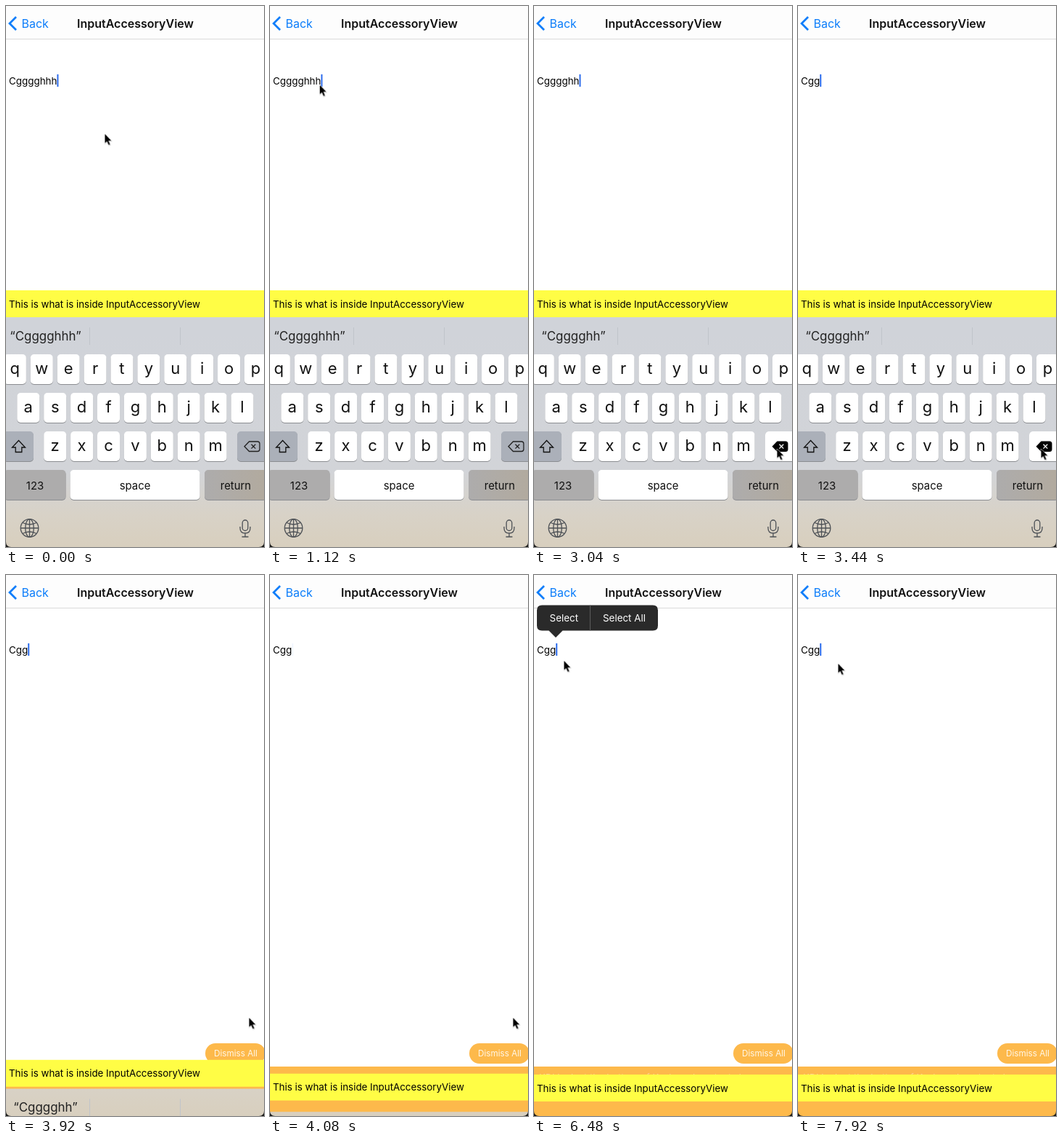
Animation, 356 px wide and 744 px high, one loop 8 s. Source, as an HTML page:

```html
<!DOCTYPE html>
<html lang="en">
<head>
<meta charset="utf-8">
<title>Input accessory</title>
<style>
  html, body { margin: 0; width: 100%; height: 100%; overflow: hidden; background: #fff; }
  svg { display: block; width: 356px; height: 744px; font: 13.4px Inter, Roboto, sans-serif; fill: #000; }
  .mid { text-anchor: middle; }
  .back { fill: #0b7dfa; font-size: 16px; }
  .title { font-size: 16px; font-weight: 600; fill: #111; }
  .orange { fill: #fdb94b; }
  .dismiss { font-size: 11.7px; fill: #fff7e8; }
  .hint { font-size: 13px; fill: #fff; }
  .letter { font-size: 22px; fill: #111; }
  .label { font-size: 14.9px; fill: #111; }
  .guess { font-size: 16.9px; fill: #222; }
  .note { font-size: 13.35px; }
  .line { fill: none; stroke: #4d5156; stroke-width: 1.3; }
</style>
</head>
<body>
<svg viewBox="0 0 356 744">
  <defs>
    <linearGradient id="board" x1="0" y1="0" x2="0" y2="1">
      <stop offset=".6" stop-color="#d0d3d9"/>
      <stop offset=".86" stop-color="#d2d4d8"/>
      <stop offset=".94" stop-color="#d8d2c7"/>
      <stop offset="1" stop-color="#d8cfbe"/>
    </linearGradient>
    <linearGradient id="warm">
      <stop offset="0" stop-color="#adacac"/>
      <stop offset="1" stop-color="#b2aa9e"/>
    </linearGradient>
  </defs>
  <rect width="356" height="744" fill="#fff"/>

  <rect width="356" height="45" fill="#fdfdfd"/>
  <rect y="45" width="356" height="1" fill="#dadada"/>
  <path d="M14 15 5 24l9 9" fill="none" stroke="#0b7dfa" stroke-width="2.8"/>
  <text class="back" x="21.5" y="29.7">Back</text>
  <text class="title mid" x="178.5" y="29.5">InputAccessoryView</text>

  <text id="field" x="4" y="108">Cgg<tspan>g</tspan><tspan>g</tspan><tspan>h</tspan><tspan>h</tspan><tspan>h</tspan></text>
  <g id="caretPlace"><rect id="caret" y="94" width="2" height="17" fill="#2c6cec"/></g>

  <rect class="orange" x="275" y="644" width="83" height="28" rx="14"/>
  <text class="dismiss mid" x="317" y="662.2">Dismiss All</text>
  <rect class="orange" y="676" width="356" height="68"/>
  <text class="hint" id="hint" x="7" y="695.5">KDI look at the bottom of Keyboard contents here</text>

  <rect id="backdrop" width="356" height="744" fill="url(#board)"/>
  <g id="keyboard">
    <path d="M115.5 442v24M240.5 442v24" stroke="#c0c4ca"/>
    <text class="guess mid" id="guessLong" x="54.5" y="459.7">“Cgggghhh”</text>
    <text class="guess mid" id="guessShort" x="54.5" y="459.7">“Cgggghh”</text>
    <g id="keys"></g>
    <path class="line" style="stroke:#111" d="M17.5 597.5 8.5 607h4.7v6.5h8.6V607h4.7z"/>
    <path class="line" style="stroke:#222" d="M335.5 599H347q3 0 3 3v7.5q0 3-3 3h-11.5L329 605.7zM338.5 602.8l5.8 5.8m0-5.8-5.8 5.8"/>
    <g id="deleteDown">
      <rect x="319" y="585" width="43" height="41" rx="5" fill="#fff"/>
      <path d="M335.5 598.5H347q3.5 0 3.5 3.5v7.5q0 3.5-3.5 3.5h-11.5L328.5 605.7z"/>
      <path class="line" style="stroke:#fff" d="M338.5 602.8l5.8 5.8m0-5.8-5.8 5.8"/>
    </g>
    <g class="line">
      <circle cx="32.5" cy="718" r="12.3"/>
      <ellipse cx="32.5" cy="718" rx="5.8" ry="12.3"/>
      <path d="M32.5 705.7v24.6M20.2 718h24.6M23 710.5q9.500 5 19 0M23 725.5q9.500-5 19 0"/>
      <rect x="326.2" y="707" width="7.6" height="14.5" rx="3.8"/>
      <path d="M323 716v2q0 7 7 7t7-7v-2M330 725v5m-4.500 0h9"/>
    </g>
  </g>

  <g id="accessory">
    <rect y="391" width="356" height="37" fill="#fffd45"/>
    <text class="note" x="4" y="414.5">This is what is inside InputAccessoryView</text>
  </g>

  <g id="menu">
    <path fill="#2a2a2a" d="M11 41.5h153q7 0 7 7v21q0 7-7 7H39.5L30 86l-9.5-9.5H11q-7 0-7-7v-21q0-7 7-7z"/>
    <path d="M77.5 41.5v35" stroke="#5c5c5c"/>
    <g class="mid" fill="#fff">
      <text x="41.3" y="64">Select</text>
      <text x="124.5" y="64">Select All</text>
    </g>
  </g>

  <path d="M0 737q0 7 7 7H0zM356 737q0 7-7 7h7z" fill="#161616"/>
  <g id="pointer">
    <path d="M-.8-1.3V13.5L2.4 10.8 4.7 15.7 7.7 14.4 5.6 9.6H9.8z" transform="translate(.5 1)" opacity=".18"/>
    <path d="M0 0V12.6L2.9 10 5.1 15 7 14.2 4.9 9.2H8.800z" stroke="#fff" paint-order="stroke"/>
  </g>
</svg>
<script>
const LOOP = 8000;
const $ = id => document.getElementById(id);

// Keys: every row is centred and evenly spaced
const rowTop = row => 479 + 53 * row;
let markup = '';
function addKey(row, center, width, label, type, fill = '#fff') {
  const top = rowTop(row);
  const rect = (y, color) =>
    `<rect x="${center - width / 2}" y="${y}" width="${width}" height="41" rx="5" fill="${color}"/>`;
  markup += rect(top + 1, '#8b8d91') + rect(top, fill) +
    `<text class="mid ${type}" x="${center}" y="${top + 26.5}">${label}</text>`;
}
['qwertyuiop', 'asdfghjkl', 'zxcvbnm'].forEach((letters, row) =>
  [...letters].forEach((char, i) =>
    addKey(row, 178.4 + 36.9 * (i - (letters.length - 1) / 2), 31, char, 'letter')));
addKey(2, 17, 42, '', 'label', '#abb0b9');
addKey(2, 340.5, 43, '', 'label', '#abb0b9');
addKey(3, 40, 85, '123', 'label', '#adacac');
addKey(3, 178, 179, 'space', 'label');
addKey(3, 317, 86, 'return', 'label', 'url(#warm)');
$('keys').innerHTML = markup;

// Each point is [ms, value]; the last value holds until the loop restarts
function track(el, prop, points, easing = 'linear') {
  const all = [[0, points[0][1]], ...points, [LOOP, points.at(-1)[1]]];
  el.animate(
    all.map(([ms, value]) => ({ offset: ms / LOOP, [prop]: value, easing })),
    { duration: LOOP, iterations: Infinity });
}
const move = (x, y) => `translate(${x}px, ${y}px)`;
const step = (el, prop, ...points) => track(el, prop, points, 'step-end');

// Pointer: rests at each stop, then glides to the next
const glides = [];
let rest = move(136.5, 176);
function glide(from, to, x, y) {
  glides.push([from, rest], [to, rest = move(x, y)]);
}
glide(640, 1440, 60, 100);
glide(1480, 1760, 60, 117);
glide(2120, 2480, 335.5, 609);
glide(4760, 5200, 170.5, 584);
glide(5200, 6000, 22, 113);
glide(6240, 6480, 41.5, 118);
glide(7760, 7920, 55.5, 122);
track($('pointer'), 'transform', glides, 'ease');

// Holding the delete key: one letter, a pause, then quick repeats
const field = $('field');
const press = 2720;
const strokeTime = i => i ? press + 400 + 80 * i : press;
const caretAt = count => move(4 + field.getSubStringLength(0, count), 0);
const extra = [...field.children].reverse();
extra.forEach((letter, i) => step(letter, 'fillOpacity', [0, 1], [strokeTime(i), 0]));
step($('caretPlace'), 'transform', [0, caretAt(8)],
  ...extra.map((_, i) => [strokeTime(i), caretAt(7 - i)]));
step($('deleteDown'), 'opacity', [0, 0], [press, 1], [3520, 0]);
step($('guessLong'), 'opacity', [0, 1], [2800, 0]);
step($('guessShort'), 'opacity', [0, 0], [2800, 1]);

// Caret blinks three times before typing and three times after it
const blink = start => [[start, 1], [start + 140, 0], [start + 420, 0], [start + 600, 1]];
track($('caret'), 'opacity', [220, 3950].flatMap(start =>
  [0, 1, 2].flatMap(i => blink(start + 960 * i))));

// Keyboard dismissal; the tinted backdrop stays put while its top edge drops
const slide = 'cubic-bezier(.38,.7,.125,1)';
const cropTop = y => `inset(${y}px 0 0 0)`;
track($('backdrop'), 'clipPath', [[3680, cropTop(428)], [4260, cropTop(744)]], slide);
track($('keyboard'), 'transform', [[3680, move(0, 0)], [4260, move(0, 316)]], slide);
track($('accessory'), 'transform', [[3680, move(0, 0)], [4160, move(0, 296)]], slide);
step($('hint'), 'opacity', [0, 0], [4320, .4]);

track($('menu'), 'opacity', [[6280, 0], [6440, 1], [7480, 1], [7680, 0]]);
</script>
</body>
</html>
```
